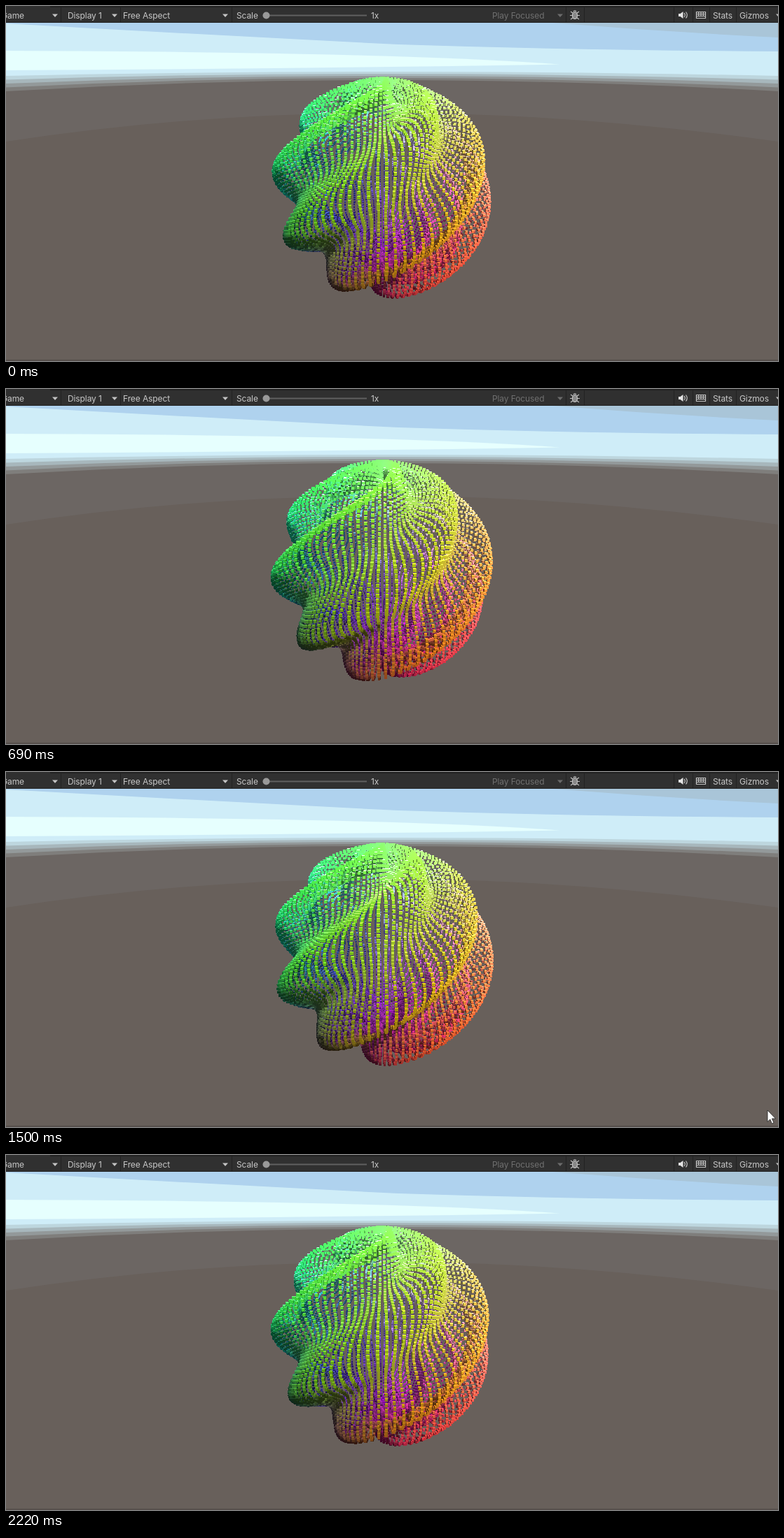
Recreate the animation shown at these times as an HTML page with a canvas. Size 1102 by 508 pixels, loop 2240 ms.

```html
<!DOCTYPE html>
<html>
<head>
<meta charset="utf-8">
<style>
html, body { margin: 0; width: 100%; height: 100%; overflow: hidden; background: #68605b; }
svg, canvas { position: absolute; left: 0; top: 0; }
canvas { left: 360px; top: 90px; }
text { font: 12px Inter, "Liberation Sans", sans-serif; letter-spacing: -.1px; fill: #c8c8c8; }
</style>
</head>
<body>
<svg width="1102" height="508" viewBox="0 0 1102 508">
  <rect y="24" width="1102" height="484" fill="#cfedf8"/>
  <path d="M0 24H1102V65Q800 63 560 55Q280 41 0 25Z" fill="#afd2ee"/>
  <path d="M780 24H1102V45Q940 37 780 24Z" fill="#a9c5d8"/>
  <path d="M0 64Q560 66 790 83.5Q400 90 0 92Z" fill="#e6fffe"/>
  <g id="haze"></g>
  <path d="M0 194Q270 153 540 153T1102 194V508H0Z" fill="#68605b"/>
  <rect y="506" width="1102" height="2" fill="#57504c"/>
  <rect width="1102" height="24" fill="#303030"/>
  <path d="M63 0H1102V2H63ZM0 23H1102V24H0Z" fill="#222"/>
  <path d="M78.5 2V23M163.5 2V23M322.5 2V23M799.5 2V23M825.5 2V23M953.5 2V23M980.5 2V23M1004.5 2V23M1042.5 2V23" stroke="#222"/>
  <path id="carets" fill="#c4c4c4"/>
  <path d="M787 11.5h8l-4 4.5z" fill="#6c6c6c"/>
  <text x="26" y="18" text-anchor="end">Game</text>
  <text x="88" y="18">Display 1</text>
  <text x="167" y="18">Free Aspect</text>
  <text x="329" y="18">Scale</text>
  <text x="521" y="18">1x</text>
  <text x="694" y="18" style="fill:#707070">Play Focused</text>
  <text x="1009" y="18">Stats</text>
  <text x="1047" y="18">Gizmos</text>
  <path d="M371 13.5H515" stroke="#606060" stroke-width="2"/>
  <circle cx="371.5" cy="13.5" r="5" fill="#999"/>
  <g fill="none" stroke="#c4c4c4" stroke-width="1.2">
    <path d="M806 8l3 2M818 8l-3 2M805 13.5h4M815 13.5h4M806 19l3-2M818 19l-3-2M810 8q2-3 4 0"/>
    <ellipse cx="812" cy="13.5" rx="3.5" ry="5" fill="#888"/>
    <path d="M968 10q2.5 3 0 6M970.500 8.500q3.500 4.500 0 9"/>
    <path d="M985.500 8.500h13v9h-13zM985.500 11.500h13M985.500 14.500h13M988.700 8.500v6M992 8.500v6M995.300 8.500v6"/>
  </g>
  <path d="M960 11h2.500l4-3v10l-4-3H960z" fill="#e4e4e4"/>
</svg>
<canvas id="view" width="350" height="340"></canvas>
<svg width="1102" height="508" viewBox="0 0 1102 508">
  <path id="pointer" d="M0 0V16.500L3.800 13L6.400 19.200L9 18L6.400 12H11.500Z" fill="#fff" stroke="#222" stroke-width=".8"/>
</svg>
<script>
const $ = id => document.getElementById(id);
const LOOP = 2240;
const STEPS = [0, 150, 270, 420, 570, 690, 840, 960, 1080, 1230, 1380, 1500, 1650, 1800, 1920, 2070, 2220];
const POINTER = { 8: [1029.5, 139], 9: [1091, 73], 11: [1087, 484] };

$('carets').setAttribute('d', [70, 155, 313, 1103].map(x => `M${x - 4} 11.5h8l-4 4.500z`).join(''));
$('haze').innerHTML = ['#bdd6de', '#a7b7bc', '#93999a', '#7f7e7c', '#6c6663'].map((c, i) => {
  const side = 100 + i * 5.5, mid = 94 + i * 3;
  return `<path d="M0 ${side}Q270 ${mid} 540 ${mid}T1102 ${side}V508H0Z" fill="${c}"/>`;
}).join('');

const ctx = $('view').getContext('2d');
const W = 350, HT = 340;
const img = ctx.createImageData(W, HT);
const depth = new Float32Array(W * HT);

// Camera one unit up, tilted down towards the sphere
const FOCAL = 418, CX = 537.2 - 360, CY = 265 - 90, DIST = 2.65;
const PITCH = 21.2 * Math.PI / 180, SIN = Math.sin(PITCH), COS = Math.cos(PITCH);
function project(x, y, z) {
  const dy = y - 1, dz = z + DIST;
  const d = dz * COS - dy * SIN;
  return [CX + FOCAL * x / d, CY - FOCAL * (dy * COS + dz * SIN) / d, d];
}

// One face: centre o, corners at o ± A ± B
function fillFace(o, a, b, color) {
  const ax = a[0] - o[0], ay = a[1] - o[1], bx = b[0] - o[0], by = b[1] - o[1];
  const det = ax * by - ay * bx;
  if (Math.abs(det) < 0.02) return;
  const rx = Math.abs(ax) + Math.abs(bx), ry = Math.abs(ay) + Math.abs(by);
  const x1 = Math.min(W - 1, o[0] + rx), y1 = Math.min(HT - 1, o[1] + ry);
  for (let y = Math.max(0, Math.floor(o[1] - ry)); y <= y1; y++) {
    for (let x = Math.max(0, Math.floor(o[0] - rx)); x <= x1; x++) {
      const dx = x + 0.5 - o[0], dy = y + 0.5 - o[1];
      if (Math.abs(dx * by - dy * bx) > Math.abs(det) || Math.abs(ax * dy - ay * dx) > Math.abs(det)) continue;
      const k = y * W + x;
      if (o[2] >= depth[k]) continue;
      depth[k] = o[2];
      img.data.set(color, k * 4);
    }
  }
}

const N = 100, HALF = 1 / N;
function spherePoints(t) {
  const points = [];
  for (let j = 0; j < N; j++) {
    for (let i = 0; i < N; i++) {
      const u = (2 * i + 1) / N - 1, v = (2 * j + 1) / N - 1;
      const r = 0.9 + 0.1 * Math.sin(Math.PI * (6 * u + 4 * v + t));
      const s = r * Math.cos(Math.PI * v / 2);
      points.push([s * Math.sin(Math.PI * u), r * Math.sin(Math.PI * v / 2), s * Math.cos(Math.PI * u)]);
    }
  }
  return points;
}

// Shadow map seen from the sun; returns how much of each cube is lit
const GRID = 180, CELL = 0.0125, SUN = [0.321, 0.766, -0.557];
function sunlight(points) {
  const map = new Float32Array(GRID * GRID).fill(-9);
  const spots = points.map(([x, y, z]) => {
    const gx = Math.floor((-0.866 * x - 0.5 * z) / CELL + GRID / 2 - 0.5);
    const gy = Math.floor((-0.383 * x + 0.643 * y + 0.663 * z) / CELL + GRID / 2 - 0.5);
    const k = gy * GRID + gx, d = SUN[0] * x + SUN[1] * y + SUN[2] * z;
    const cells = [k, k + 1, k + GRID, k + GRID + 1];
    for (const c of cells) map[c] = Math.max(map[c], d);
    return { cells, d };
  });
  return spots.map(({ cells, d }) => cells.filter(c => map[c] < d + 0.08).length / 4);
}

function shade([x, y, z], ambient, sun, gloss) {
  return [
    255 * ((x + 1) / 2 * (ambient + sun) + gloss * 0.9),
    255 * ((y + 1) / 2 * (ambient + sun * 0.957) + gloss),
    255 * ((z + 1) / 2 * (ambient + sun * 0.84) + gloss * 0.95),
    255
  ];
}

function drawSphere(t) {
  depth.fill(Infinity);
  img.data.fill(0);
  const points = spherePoints(t), lit = sunlight(points);
  points.forEach((p, i) => {
    const [x, y, z] = p, h = HALF, sun = lit[i];
    const zf = z - h, yt = y + h, side = x < 0 ? 1 : -1, xs = x + side * h;
    fillFace(project(x, y, zf), project(x + h, y, zf), project(x, y + h, zf),
      shade(p, 0.5, sun * 0.557, sun * 0.04));
    const facing = Math.max(0, 1 - yt) / Math.hypot(x, 1 - yt, z + DIST);
    fillFace(project(x, yt, z), project(x + h, yt, z), project(x, yt, z + h),
      shade(p, 0.58, sun * 0.766, 0.04 + 0.75 * (1 - facing) ** 5));
    fillFace(project(xs, y, z), project(xs, y + h, z), project(xs, y, z + h),
      shade(p, 0.46, side > 0 ? sun * 0.321 : 0, 0));
  });
  ctx.putImageData(img, 0, 0);
}

let shown = -1;
function tick() {
  const now = performance.now() % LOOP;
  const step = STEPS.filter(s => s <= now).length - 1;
  if (step !== shown) {
    shown = step;
    drawSphere(1.3 + step / 7);
    const [x, y] = POINTER[step] || [-50, -50];
    $('pointer').setAttribute('transform', `translate(${x} ${y})`);
  }
  requestAnimationFrame(tick);
}
tick();
</script>
</body>
</html>
```
